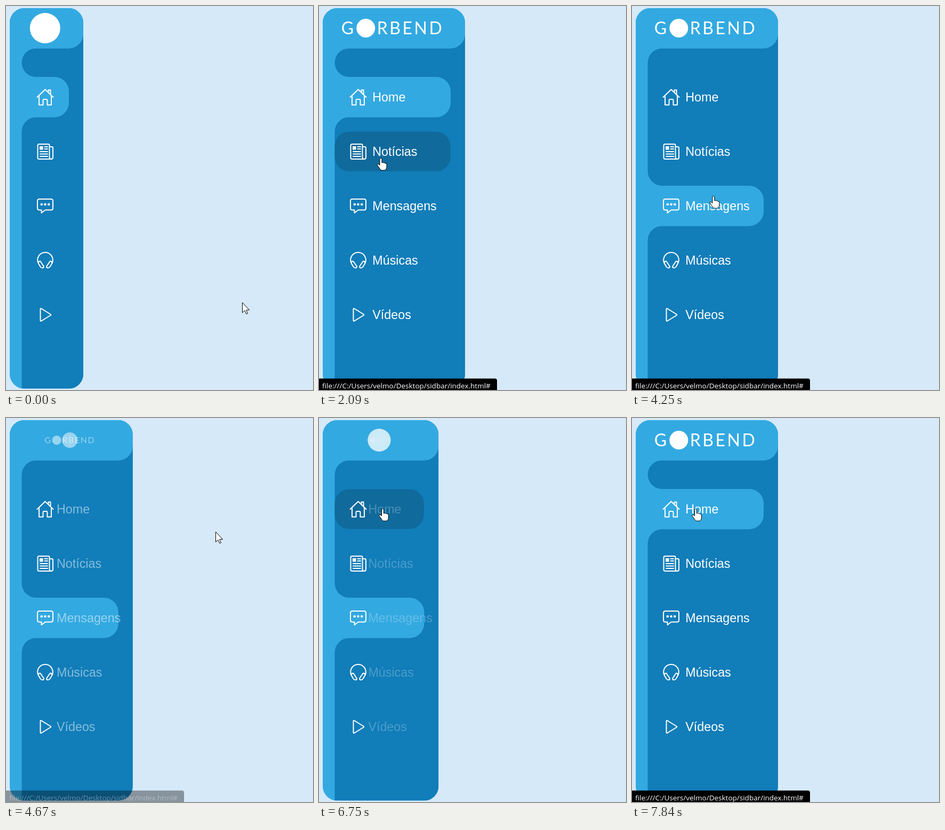
An HTML page with a canvas for the animation above (8 s loop, 576x720 px).

```html
<!DOCTYPE html>
<html lang="pt">
<head>
<meta charset="utf-8">
<title>Sidebar</title>
<style>
  html, body { margin: 0; width: 576px; height: 720px; overflow: hidden; }
  canvas { display: block; }
</style>
</head>
<body>
<canvas width="576" height="720"></canvas>
<script>
const ctx = document.querySelector('canvas').getContext('2d');
const LOOP = 8000, STEP = 1000 / 12;
const PAGE = '#d6e9f8', LIGHT = '#33a9e1', DARK = '#117db9', HOVER = '#106a9c';
const LEFT = 7, TOP = 4, BOTTOM = 717.5, INNER = 29.5, RADIUS = 27;

// Icons are drawn around the centre of their row
const ITEMS = [
  { label: 'Home', line: 'M-15 0L0-14.5 15 0M-11.5-2.5V14.5H-4V6Q-4 4-2 4H2Q4 4 4 6V14.5H11.5V-2.5M6-9V-13.5H10V-5' },
  { label: 'Notícias',
    line: 'M-11.5-14H6Q8-14 8-12V11Q8 14 11.5 14H-11Q-14 14-14 11.5V-11.5Q-14-14-11.5-14M8-9H12.5Q14.5-9 14.5-7V11Q14.5 14 11.5 14M-1-9H4.5M-1-5H4.5M-9.5 0H4.5M-9.5 4.5H4.5M-9.5 9H4.5',
    fill: 'M-10.5-10h6.5v6.5h-6.5z' },
  { label: 'Mensagens',
    line: 'M-11-13H11Q14.5-13 14.5-9.5V4Q14.5 7.5 11 7.5H0L-7 13V7.5H-11Q-14.5 7.5-14.5 4V-9.5Q-14.5-13-11-13Z',
    fill: 'M-9-3a2.3 2.3 0 1 1 4.6 0a2.3 2.3 0 1 1-4.6 0M-2.3-3a2.3 2.3 0 1 1 4.6 0a2.3 2.3 0 1 1-4.6 0M4.4-3a2.3 2.3 0 1 1 4.6 0a2.3 2.3 0 1 1-4.6 0' },
  { label: 'Músicas',
    line: 'M-12 7A14.3 14.3 0 1 1 12 7M-8.5 2.5L-2.8 11Q-2 13.5-4.5 14Q-7 14.5-9 12L-12.5 6Q-13.5 3-11.5 2Q-9.5 1-8.5 2.5M8.5 2.5L2.8 11Q2 13.5 4.5 14Q7 14.5 9 12L12.5 6Q13.5 3 11.5 2Q9.5 1 8.5 2.5' },
  { label: 'Vídeos', line: 'M-9-10.5V10.5Q-9 12.5-7 11.5L10 1Q11.5 0 10-1L-7-11.5Q-9-12.5-9-10.5Z' },
].map(({ label, line, fill }) => ({ label, line: new Path2D(line), fill: fill && new Path2D(fill) }));

const ARROW = new Path2D('M0 0V19L4.4 15 7.4 21.5 10 20.3 7.2 14H13Z');
const HAND = new Path2D('M-2 1.5Q0-1 2 1.5V9Q4 7.5 5 9Q7 8 8 10Q11 9.5 11 12V17Q11 22 7 23H1Q-2 21-4 17L-7 13Q-6 10-3.5 12L-2 13.5Z');

// [start, end, x, y]
const MOVES = [
  [0, 1, 443.5, 556], [500, 1180, 94, 279], [1340, 1750, 116, 285], [2840, 3250, 116, 378],
  [4170, 4520, 393.5, 213.5], [4950, 5300, 391, 214.5], [6090, 6690, 119.5, 170],
];
// [time, row], -1 for none
const HOVERS = [[0, -1], [1060, 1], [2960, -1], [3060, 2], [4320, -1], [6600, 0]];
const ACTIVE = [[0, 0], [2240, 1], [3580, 2], [7740, 0]];
const OPEN = 1008, CLOSE = 4370, REOPEN = 6572;

const clamp = v => Math.min(1, Math.max(0, v));
const ramp = (t, start, end) => clamp((t - start) / (end - start));
const smooth = p => p * p * (3 - 2 * p);
const latest = (list, t) => list.filter(([start]) => start <= t).pop()[1];

// The CSS "ease" curve: cubic-bezier(.25, .1, .25, 1)
function ease(p) {
  const bezier = (u, a, b) => 3 * u * (1 - u) ** 2 * a + 3 * u * u * (1 - u) * b + u ** 3;
  let low = 0, high = 1;
  for (let i = 0; i < 20; i++) {
    const mid = (low + high) / 2;
    if (bezier(mid, .25, .25) < clamp(p)) low = mid; else high = mid;
  }
  return bezier(low, .1, 1);
}

function openness(t, duration, closeDelay) {
  if (t < CLOSE) return ease((t - OPEN) / duration);
  if (t < REOPEN) return 1 - ease((t - CLOSE - closeDelay) / duration);
  return ease((t - REOPEN) / duration);
}

function box(color, x, y, right, bottom, radii = 0) {
  ctx.fillStyle = color;
  ctx.beginPath();
  ctx.roundRect(x, y, right - x, bottom - y, radii);
  ctx.fill();
}

function dot(x, y, r) {
  ctx.beginPath();
  ctx.arc(x, y, r, 0, 7);
  ctx.fill();
}

function at(x, y, scale, alpha, paint) {
  ctx.save();
  ctx.translate(x, y);
  ctx.scale(scale, scale);
  ctx.globalAlpha = alpha;
  paint();
  ctx.restore();
}

function drawPanel(right, active, hover) {
  const rowTop = row => 133 + 102 * row;
  const pillRight = right - 27, y = rowTop(active);
  box(LIGHT, LEFT, TOP, right, BOTTOM);
  box(DARK, INNER, 79.5, right, y, [RADIUS, 0, 0, RADIUS]);
  box(DARK, INNER, y + 75.5, right, BOTTOM, [RADIUS, 0, 0, 0]);
  box(DARK, pillRight - RADIUS, y - 1, right, y + 77);
  box(LIGHT, INNER, y, pillRight, y + 75.5, [0, RADIUS, RADIUS, 0]);
  box(DARK, right - RADIUS, 50, right, 82);
  box(LIGHT, LEFT, TOP, right, 79.5, [0, 0, RADIUS, 0]);
  if (hover >= 0 && hover !== active)
    box(HOVER, INNER, rowTop(hover) + .5, pillRight - .5, rowTop(hover) + 75, RADIUS);
}

function drawItems(shown) {
  ctx.fillStyle = ctx.strokeStyle = '#fff';
  ctx.font = '23.3px "Liberation Sans", Arial, sans-serif';
  ctx.lineWidth = 2;
  ctx.lineJoin = ctx.lineCap = 'round';
  ITEMS.forEach(({ label, line, fill }, row) => {
    const y = 171 + 102 * row;
    at(73.5, y, 1, 1, () => {
      ctx.stroke(line);
      if (fill) ctx.fill(fill);
    });
    at(89.8 + 10.5 * shown, y + 8, 1, shown, () => ctx.fillText(label, 0, 0));
  });
}

function drawBrand(right, shown) {
  const x = (LEFT + right) / 2 - 2.7;
  at(x, 41.5, 1 - shown, 1 - shown, () => dot(0, 0, 28.5));
  at(x, 41.5, shown, shown, () => {
    ctx.font = '32px Lato, sans-serif';
    ctx.letterSpacing = '3.5px';
    ctx.fillText('G', -96, 11.5);
    dot(-50, 0, 17.5);
    ctx.fillText('RBEND', -29, 11.5);
  });
}

function drawStatus(t) {
  ctx.globalAlpha = t < 4000 ? ramp(t, 1400, 1520)
    : t < 5000 ? 1 - ramp(t, 4540, 4740) : ramp(t, 6940, 7060);
  box('#000', 0, 698.5, 334, 720, [0, 4, 0, 0]);
  ctx.fillStyle = '#fff';
  ctx.font = '13.5px "Open Sans", sans-serif';
  ctx.fillText('file:///C:/Users/velmo/Desktop/sidbar/index.html#', 6, 717);
  ctx.globalAlpha = 1;
}

function drawCursor(t, shape) {
  let x = 0, y = 0;
  for (const [start, end, toX, toY] of MOVES) {
    const p = start ? smooth(ramp(t, start, end)) : 1;
    x += (toX - x) * p;
    y += (toY - y) * p;
  }
  at(x, y, 1, 1, () => {
    ctx.fillStyle = '#fff';
    ctx.strokeStyle = '#000';
    ctx.lineWidth = 1;
    ctx.fill(shape);
    ctx.stroke(shape);
  });
}

function draw(t) {
  const right = 145 + 129 * openness(t, 500, 200);
  const shown = openness(t, 1000, 0);
  const hover = latest(HOVERS, t);
  box(PAGE, 0, 0, 576, 720);
  ctx.save();
  ctx.beginPath();
  ctx.roundRect(LEFT, TOP, right - LEFT, BOTTOM - TOP, RADIUS);
  ctx.clip();
  drawPanel(right, latest(ACTIVE, t), hover);
  drawItems(shown);
  drawBrand(right, shown);
  ctx.restore();
  drawStatus(t);
  drawCursor(t, hover < 0 ? ARROW : HAND);
}

function tick() {
  const t = performance.now() % LOOP;
  draw(Math.floor(t / STEP) * STEP);
  requestAnimationFrame(tick);
}
tick();
</script>
</body>
</html>
```
